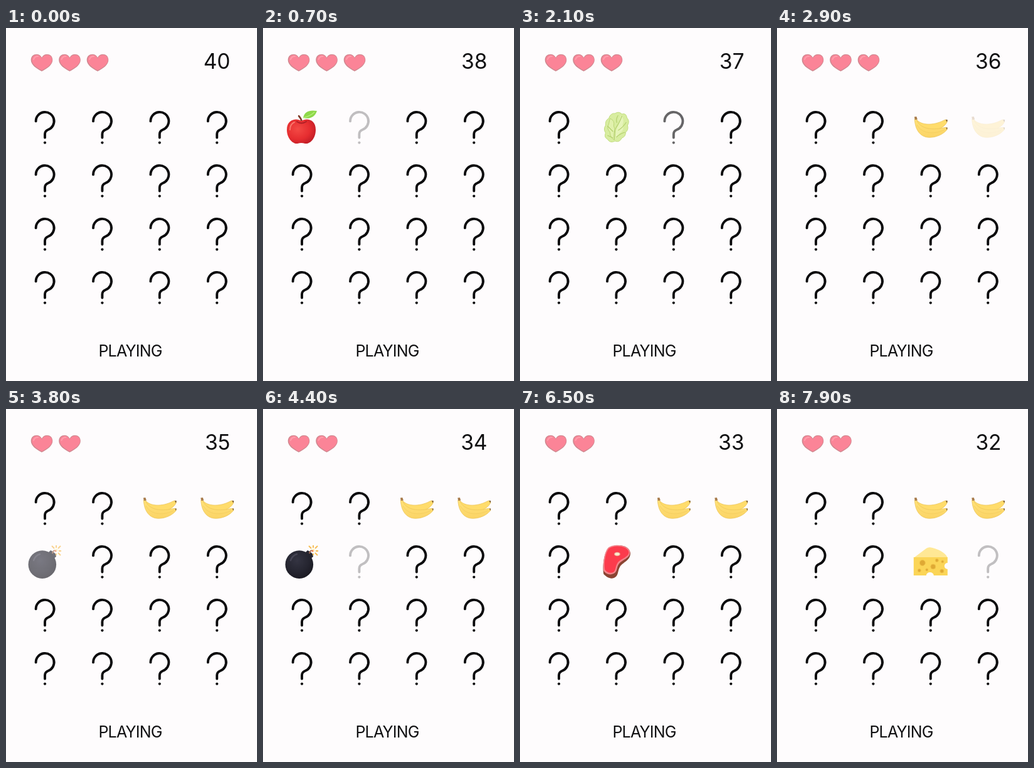
Recreate the animation shown at these times as an HTML page. Size 400 px wide and 562 px high, loop 8 s.

```html
<!DOCTYPE html>
<html lang="en">
<head>
<meta charset="utf-8">
<title>Memory game</title>
<style>
  html, body { margin: 0; width: 100%; height: 100%; overflow: hidden; background: #fefcfd; }
  svg { display: block; width: 100%; height: 100%; }
  text { font-family: Inter, Roboto, sans-serif; fill: #101012; }
</style>
</head>
<body>
<svg viewBox="0 0 400 562">
  <defs>
    <radialGradient id="red" cx=".38" cy=".4" r=".7">
      <stop offset="0" stop-color="#f34a45"/><stop offset=".6" stop-color="#e62d30"/><stop offset="1" stop-color="#bd1b25"/>
    </radialGradient>
    <radialGradient id="iron" cx=".42" cy=".35" r=".7">
      <stop offset="0" stop-color="#343442"/><stop offset=".6" stop-color="#252530"/><stop offset="1" stop-color="#191820"/>
    </radialGradient>
    <linearGradient id="peel" x2="0" y2="1">
      <stop offset="0" stop-color="#ffe27a"/><stop offset="1" stop-color="#fbd465"/>
    </linearGradient>

    <g id="hidden" fill="none" stroke="#0b0b0d" stroke-width="3.9" stroke-linecap="round">
      <path d="M-14.4 -9.6A14.5 14.5 0 1 1 5 4Q0 6 0 11V16.6"/>
      <circle cy="24.6" r="2.1" fill="#0b0b0d" stroke="none"/>
    </g>

    <g id="heart">
      <path d="M0 14C-9 9.5 -17.3 3.5 -17.3 -4C-17.3 -15 -3.5 -16 0 -8C3.5 -16 17.3 -15 17.3 -4C17.3 3.5 9 9.5 0 14Z" fill="#d08890"/>
      <path d="M0 12.3C-8 8 -15.7 2.5 -15.7 -4C-15.7 -13.5 -3.5 -14.5 0 -6.5C4 -14.5 16.5 -13.5 16.5 -4C16.5 2.5 8 8.5 0 12.3Z" fill="#fb8497"/>
      <path d="M-13 -5Q-11.5 -10 -6 -10" fill="none" stroke="#ff9dab" stroke-width="2" stroke-linecap="round"/>
    </g>

    <g id="apple">
      <path d="M0 -8Q-1 -14 -5 -18" fill="none" stroke="#7d3a26" stroke-width="2.5" stroke-linecap="round"/>
      <path d="M2 -15C4 -25 12 -28 24 -26C21 -17 13 -12 2 -15Z" fill="#8ed84a"/>
      <path d="M2 -15Q12 -17 20 -24" fill="none" stroke="#b6ef78" stroke-width="1.5"/>
      <path d="M-1 -10C-8 -15 -24 -13 -24 4C-24 17 -15 27 -7 26Q-1 24 5 26C14 27 22 17 22 4C22 -13 7 -15 -1 -10Z" fill="url(#red)"/>
      <path d="M-8 -9Q-1 -4 7 -9" fill="none" stroke="#ae1e25" stroke-width="2" stroke-linecap="round"/>
      <path d="M-19 4Q-19 -5 -12 -8" fill="none" stroke="#f9786c" stroke-width="2" stroke-linecap="round"/>
    </g>

    <g id="lettuce" stroke-linejoin="round">
      <path d="M-2 -22Q4 -26 9 -21Q16 -23 17 -15Q22 -10 18 -3Q20 4 15 8Q15 15 9 17Q5 25 -2 22Q-10 26 -14 19Q-20 16 -17 9Q-21 3 -17 -3Q-18 -11 -12 -14Q-9 -23 -2 -22Z" fill="#d8eda0" stroke="#c2dd80"/>
      <path d="M7 -19Q14 -13 10 -4Q14 4 5 10L-3 20Q-2 7 3 -3Z" fill="#e6f4b9"/>
      <path d="M-10 -14Q-2 -11 -4 -2Q0 7 -3 20Q-10 17 -10 8Q-16 2 -12 -5Z" fill="#e1f1ad" stroke="#bcd777"/>
      <path d="M9 -18Q5 -7 0 0T-3 20M16 -8Q10 1 3 5M14 8Q6 10 0 16M-14 -2L-5 7M-14 13L-5 17M3 -19Q-1 -13 1 -7" fill="none" stroke="#b4d06f" stroke-width="1.2"/>
    </g>

    <g id="banana">
      <path d="M-23 -13C-16 -3 4 -2 21 -11Q27 -14 26.5 -9C22 2 6 7 -8 4C-18 0 -23 -7 -24 -12Z" fill="#ffdc6b" stroke="#ecc65a" stroke-width=".8"/>
      <path d="M-23 -13C-18 1 -2 6 22 .5Q28 -.5 26 4C18 14 2 18 -8 15.5C-20 12 -25 0 -25.5 -13Z" fill="url(#peel)" stroke="#edc65a" stroke-width=".8"/>
      <path d="M-22 -4C-15 9 3 13 22 4" fill="none" stroke="#f5cf61"/>
      <path d="M-26 -16.5L-22.5 -17L-21 -12.5L-25 -12Z" fill="#a87b4a"/>
      <path d="M24 -12L27 -12L26 -8ZM24.5 .5L27 .5L26 4Z" fill="#7c5c38"/>
    </g>

    <g id="bomb">
      <path d="M4 -13L9 -18Q18 -14 18 -8L12 -3Z" fill="#282732"/>
      <circle cx="-4.2" cy="4.6" r="22.3" fill="url(#iron)"/>
      <path d="M-18 -2Q-15 -10 -8 -12" fill="none" stroke="#454453" stroke-width="2.5" stroke-linecap="round"/>
      <path d="M12 -13Q13 -18 17 -18" fill="none" stroke="#a36b50" stroke-width="2"/>
      <path d="M18 -22V-26M21 -21L25 -25M22 -17H26M21 -14L25 -10M18 -13V-10M15 -21L11 -25" fill="none" stroke="#f6bd55" stroke-width="1.9"/>
      <circle cx="18" cy="-18" r="2.5" fill="#fff0b8"/>
      <circle cx="17" cy="-17" r="1.3" fill="#ef6544"/>
    </g>

    <g id="meat">
      <path d="M-13 -21C-5 -28 20 -29 22.5 -14C23 -2 10 1 6 8C2 14 4 21 -2 25C-8 29 -15 25 -20 20C-22 14 -21 -12 -13 -21Z" fill="#8b4433"/>
      <path d="M-13 -22C-5 -29 20 -28 22 -15C22 -5 9 -3 4 4C0 10 2 16 -4 19C-10 22 -16 20 -20 15C-22 8 -20 -14 -13 -22Z" fill="#f2838a"/>
      <path d="M-12 -20.5C-4 -27 18.500 -26 20 -15C20 -7 7 -5 2 2C-2 8 0 14 -5 17C-10 19 -15 17 -18 13C-20 6 -18 -13 -12 -20.5Z" fill="#fc3b4c"/>
      <ellipse cx="1.5" cy="-12" rx="5" ry="3.3" fill="#e8a293"/>
      <ellipse cx="1.5" cy="-12" rx="3.7" ry="2.2" fill="#fbeccb"/>
    </g>

    <g id="cheese">
      <path d="M-27 -6L-7 -21Q-3 -24 3 -22C15 -19 25 -13 27 -6Z" fill="#ffe895"/>
      <path d="M-27 -7H27V2A5 5 0 0 0 27 12V22H5A6 5 0 0 0 -7 22H-27Z" fill="#fbd557"/>
      <g fill="#dfa934" stroke="#f1c348">
        <circle cx="-13" cy="2" r="4.5"/><circle cx="4" cy="8" r="4"/><circle cx="10" cy="-2" r="2.5"/>
        <circle cx="-18" cy="14" r="2.5"/><circle cx="18" cy="15" r="3"/><circle cx="19" cy="0" r="2"/><circle cx="-6" cy="13" r="2"/>
      </g>
    </g>
  </defs>
  <rect width="400" height="562" fill="#fefcfd"/>
  <g id="hearts"></g>
  <text id="count" x="357.5" y="64.5" font-size="33.5" text-anchor="end"></text>
  <g id="board"></g>
  <text x="198" y="522.6" font-size="25" letter-spacing="-.8" text-anchor="middle">PLAYING</text>
</svg>
<script>
const LOOP = 8000, STEP = 100, HEART_LOST = 3700;
const $ = id => document.getElementById(id);

// Each tap: cell, picture, counter drop, press start, time it turns back.
const taps = [
  [0, 'apple', 100, 100, 1400],
  [1, 'lettuce', 600, 600, 2600],
  [2, 'banana', 2000, 2100, LOOP],
  [3, 'banana', 2600, 2700, LOOP],
  [4, 'bomb', 3400, 3500, 5100],
  [5, 'meat', 4200, 4300, 7600],
  [6, 'cheese', 6400, 6900, LOOP],
  [7, 'cheese', 7600, 7800, LOOP]
].map(([cell, face, count, press, back]) => ({ cell, face, count, press, back }));

const fade = [.62, .25, .25, .65];

function use(parent, id, x, y) {
  const el = document.createElementNS('http://www.w3.org/2000/svg', 'use');
  el.setAttribute('href', '#' + id);
  el.setAttribute('transform', `translate(${x} ${y})`);
  return $(parent).appendChild(el);
}

const hearts = [0, 1, 2].map(i => use('hearts', 'heart', 57 + i * 44.5, 55));
const cells = Array.from({ length: 16 }, (_, i) =>
  use('board', 'hidden', 62 + i % 4 * 91.4, 158 + Math.floor(i / 4) * 85));

function draw(time) {
  const t = Math.floor(time / STEP) * STEP;
  $('count').textContent = 40 - taps.filter(tap => t >= tap.count).length;
  hearts[2].setAttribute('opacity', t < HEART_LOST ? 1 : 0);
  for (const { cell, face, press, back } of taps) {
    const age = t - press;
    cells[cell].setAttribute('href', '#' + (age >= 200 && t < back ? face : 'hidden'));
    cells[cell].setAttribute('opacity', fade[age / STEP] ?? 1);
  }
}

const start = performance.now();
function tick() {
  draw((performance.now() - start) % LOOP);
  requestAnimationFrame(tick);
}
tick();
</script>
</body>
</html>
```
